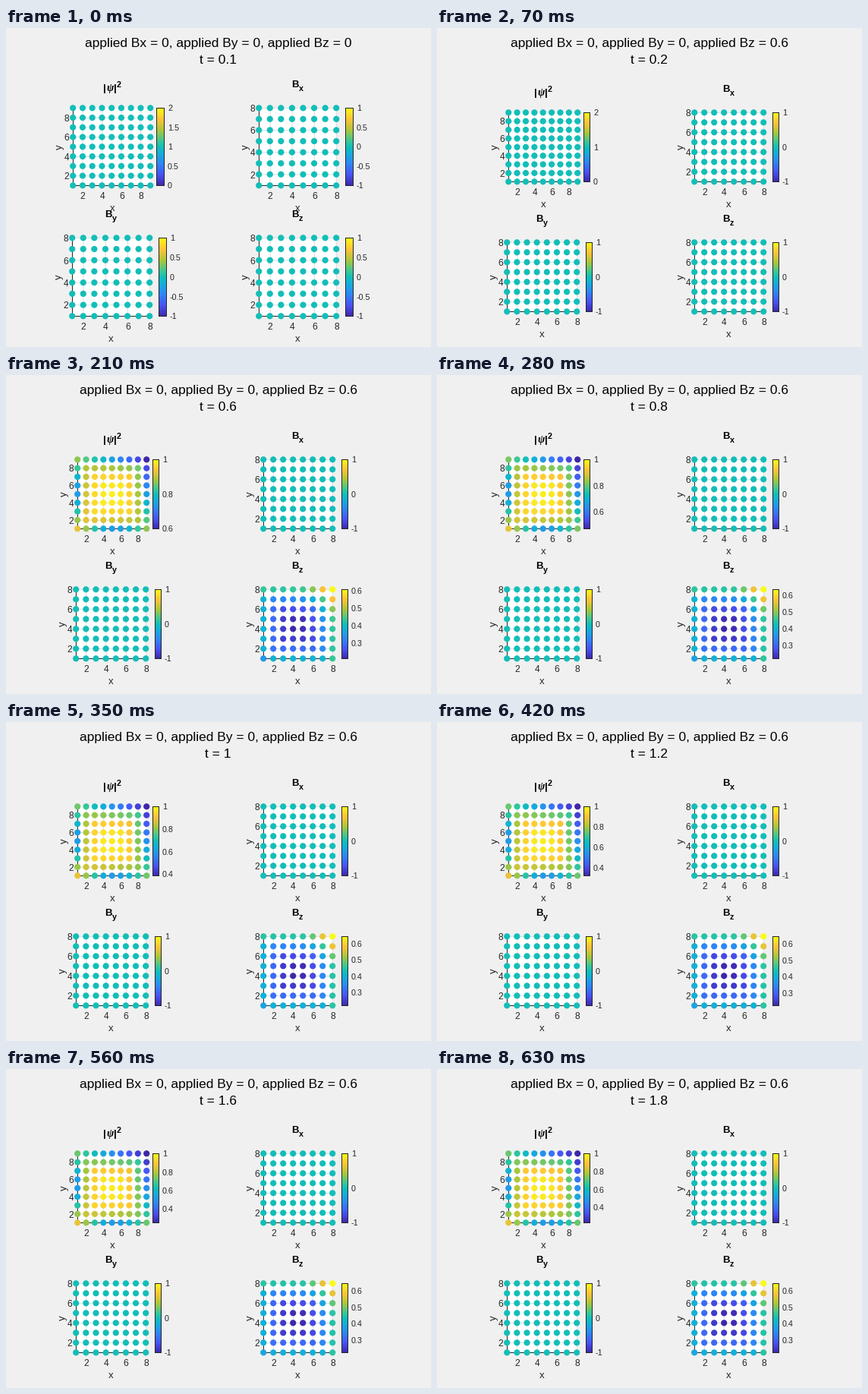
These frames come from a looping animation (560 by 420 pixels, 0.7 s). A matplotlib script:

```python
import numpy as np
import matplotlib.pyplot as plt
from matplotlib.animation import FuncAnimation
from matplotlib.colors import LinearSegmentedColormap
from matplotlib.patches import Rectangle

W, H, DPI = 560, 420, 100
PX = 72 / DPI
DARK = "#262626"
STEP = .2  # model time per frame
plt.rcParams["font.family"] = "Liberation Sans"

# key colours of parula
parula = LinearSegmentedColormap.from_list("parula", [
    (0, (.242, .150, .660)), (1 / 7, (.281, .323, .958)),
    (2 / 7, (.179, .529, .968)), (3 / 7, (.069, .695, .839)),
    (1 / 2, (.070, .746, .726)), (4 / 7, (.216, .784, .592)),
    (5 / 7, (.672, .779, .223)), (6 / 7, (.997, .766, .220)),
    (1, (.977, .984, .081))])


def soft_max(p):
    return (p[:, None] ** 8 + p[None, :] ** 8) ** .125


def psi_field(slope, high, power, rim):
    """Density scaled to 0..1: a dip along the edges, deepest at the far corner."""
    i = np.arange(9)
    u = i / 8
    tilt = 1 + .4 * (i[:, None] + i - 8) / 8
    f = 1 - soft_max(rim * (.38 ** (i - 1.) + .38 ** (7. - i))) * tilt
    f[0, :] = f[:, 0] = (.82 - slope * u
                         - (.465 - slope / 2) * np.abs(np.sin(np.pi * u)) ** 1.3)
    f[8, :] = f[:, 8] = high * (1 - u) ** power
    return f


def bz_field(curve, near, far, width):
    """Field scaled to 0..1: screened inside, peaked at the far corner."""
    i = np.arange(8)
    f = soft_max(curve * (i - 3.3) ** 2)
    a, b = 7 - i[:, None], 7 - i
    f += far * np.exp(-(a * a + b * b - .7 * a * b) / width)
    f[0, 0] -= near
    return np.clip(f, 0, 1)


PSI = psi_field(.13, .72, .75, .20), psi_field(.20, .63, 1, .31)
BZ = bz_field(.043, .25, .40, 4.5), bz_field(.039, .07, .42, 2.5)


def settle(a, b, s, tau):
    return b + (a - b) * np.exp(-s / tau)


def panel_state(n, k):
    """Scaled values, colour limits and tick step of panel n at step k."""
    s = STEP * (k - 2)
    if n == 0 and k > 1:
        lo = settle(.778, .18, s, .56)
        return settle(*PSI, s, .3), lo, 1, .1 if lo > .7 else .2
    if n == 3 and k > 1:
        lo, hi = settle(.17, .2215, s, .13), settle(.515, .647, s, .175)
        return settle(*BZ, s, .2), lo, hi, .1
    size = 8 if n else 9
    lo = -1 if n else 0
    return np.full((size, size), .5), lo, lo + 2, 1 if k else .5


fig = plt.figure(figsize=(W / DPI, H / DPI), dpi=DPI, facecolor="#f0f0f0")
ax = fig.add_axes([0, 0, 1, 1])


def text(x, y, s, size, ha="center", color=DARK, **kw):
    ax.text(x, y, s, fontsize=size * PX, ha=ha, va="baseline", color=color, **kw)


def mid_text(x, y, s, size, ha="center"):
    text(x, y + .36 * size, s, size, ha)


def line(x, y, color):
    ax.plot(np.array(x) + .5, np.array(y) + .5, color=color, lw=PX,
            solid_capstyle="projecting", snap=False, zorder=2)


def panel_title(n, cx, top):
    bold = dict(color="black", weight="bold")
    if n == 0:
        y = top - 22
        text(129.7, y, "|", 13.2, **bold)
        text(136.8, y, "ψ", 14, family="Liberation Serif", style="italic", **bold)
        text(144, y, "|", 13.2, **bold)
        text(149, y - 5.5, "2", 10.8, **bold)
    else:
        text(cx - 8, top - 27, "B", 13.2, "left", **bold)
        text(cx + 1.8, top - 22, "xyz"[n - 1], 10.8, "left", **bold)


def color_bar(x, top, bottom, width, lo, hi, step):
    ax.imshow(np.linspace(0, 1, 256)[:, None], cmap=parula, origin="lower",
              extent=(x, x + width + 1, bottom + 1, top), aspect="auto", zorder=2)
    right = x + width
    line([x, right, right, x, x], [top, top, bottom, bottom, top], DARK)
    for m in range(int(np.ceil(lo / step - 1e-6)), int(hi / step + 1e-6) + 1):
        y = bottom - (m * step - lo) / (hi - lo) * (bottom - top)
        mid_text(right + 5, y + .5, f"{m * step:g}", 10.8, "left")


def panel(n, k):
    values, lo, hi, step = panel_state(n, k)
    half = 45.6 if k else 51.2
    cx = 384.2 if n % 2 else 138 if n else 139.3
    cy = 327.65 if n > 1 else 156.2
    x0, x1 = round(cx - half), round(cx + half)
    top, bottom = round(cy - half), round(cy + half)
    pos = np.linspace(0, 1, len(values))
    xs, ys = x0 + pos * (x1 - x0), bottom - pos * (bottom - top)

    ax.add_patch(Rectangle((x0, top), x1 - x0, bottom - top, fc="white", lw=0))
    for i in range(1, 8, 2):
        line([xs[i]] * 2, [top, bottom], "#dfdfdf")
        line([x0, x1], [ys[i]] * 2, "#dfdfdf")
        mid_text(xs[i] + .5, bottom + 13.3, str(i + 1), 12)
        mid_text(x0 - 4.7, ys[i] + .8, str(i + 1), 12, "right")
    line([x0, x0, x1], [top, bottom, bottom], DARK)
    gx, gy = np.meshgrid(xs, ys)
    ax.scatter(gx + .2, gy + .3, s=(8.2 * PX) ** 2, c=values, cmap=parula,
               vmin=0, vmax=1, linewidths=0, snap=False, zorder=3)

    text(cx + .4, bottom + 34, "x", 13.2)
    text(x0 - 14.5, cy, "y", 13.2, rotation=90, rotation_mode="anchor")
    panel_title(n, cx, top)
    color_bar(x1 + (12 if n else 8), top, bottom, 8 if k else 10, lo, hi, step)


def draw(k):
    ax.clear()
    ax.axis("off")
    bz, t = (.6, STEP * k) if k else (0, .1)
    text(279.6, 25.5, f"applied Bx = 0, applied By = 0, applied Bz = {bz}", 17.33,
         color="black")
    text(279.6, 47, f"t = {t:g}", 17.33, color="black")
    for n in range(4):
        panel(n, k)
    ax.set_xlim(0, W)
    ax.set_ylim(H, 0)
    return []


anim = FuncAnimation(fig, draw, frames=10, init_func=lambda: [], interval=70,
                     repeat=True, repeat_delay=0)
plt.show()
```
